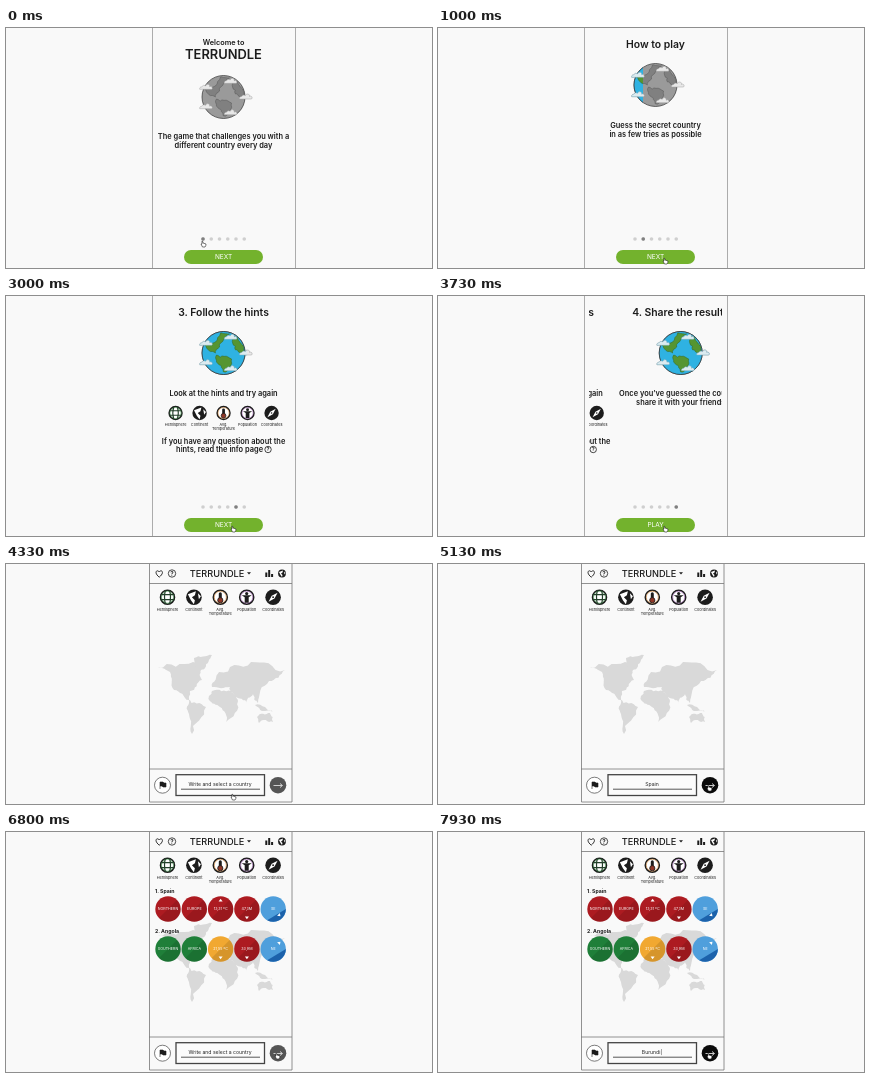
An HTML page for the animation above (8000 ms loop, 426 px wide and 240 px high).

```html
<!DOCTYPE html>
<html lang="en">
<head>
<meta charset="utf-8">
<title>Country guessing game</title>
<style>
html, body { margin: 0; width: 100%; height: 100%; overflow: hidden; background: #f9f9f9; }
svg { display: block; width: 100vw; height: 100vh; }
text { font-family: Inter, sans-serif; }
.gray { filter: grayscale(1); }
</style>
</head>
<body>
<svg id="stage" viewBox="0 0 426 240"></svg>
<script>
const LOOP = 8000, STEP = 132, MID = 217.5, GAME_START = 4250;
const TITLE = 'TERRUNDLE', PROMPT = 'Write and select a country';
const INK = '#1c1c1c', RED = '#ad1b21', GREEN = '#1f7f39', YELLOW = '#f1a831', BLUE = '#4f9fdc';
const slideStarts = [420, 1350, 2170, 2770, 3625];
const guesses = [
  { word: 'Spain', start: 4600, submit: 5200 },
  { word: 'Angola', start: 5800, submit: 6300 },
  { word: 'Burundi', start: 7200, submit: LOOP }
];
const pointerStart = [196, 213];
const pointerMoves = [
  { start: 70, to: [226, 230] },
  { start: GAME_START + 100, to: [214, 221] },
  { start: 4780, to: [270, 221] }
];

const clamp = v => Math.max(0, Math.min(1, v));
const easeOut = v => 1 - (1 - clamp(v)) ** 3;
const mix = (a, b, f) => a + (b - a) * f;
let seed = 11;
const random = () => (seed = seed * 16807 % 2147483647) / 2147483647;

// Drawing helpers
const text = (x, y, size, str, weight = 600, fill = INK, anchor = 'middle') =>
  `<text x="${x}" y="${y}" font-size="${size}" font-weight="${weight}" fill="${fill}" text-anchor="${anchor}">${str}</text>`;
const path = (d, fill = 'none', stroke = 'none', width = 1) =>
  `<path d="${d}" fill="${fill}" stroke="${stroke}" stroke-width="${width}" stroke-linejoin="round"/>`;
const circle = (x, y, r, fill = 'none', stroke = 'none', width = 1) =>
  `<circle cx="${x}" cy="${y}" r="${r}" fill="${fill}" stroke="${stroke}" stroke-width="${width}"/>`;
const rect = (x, y, w, h, fill = 'none', stroke = 'none', width = 1, rx = 0) =>
  `<rect x="${x}" y="${y}" width="${w}" height="${h}" rx="${rx}" fill="${fill}" stroke="${stroke}" stroke-width="${width}"/>`;
const at = (x, y, body, extra = '') => `<g transform="translate(${x} ${y}) ${extra}">${body}</g>`;
const repeat = (n, draw) => Array.from({ length: n }, (_, i) => draw(i)).join('');
const help = (x, y, r) => circle(x, y, r, 'none', INK, .8) + text(x, y + r * .62, r * 1.7, '?');

// Splits every edge at a randomly shifted midpoint, so a few corners become a coastline
const roughen = (points, depth) => depth === 0 ? points : roughen(points.flatMap(([x, y], i) => {
  const [u, v] = points[(i + 1) % points.length], shift = (random() - .5) * .4;
  return [[x, y], [(x + u) / 2 + (v - y) * shift, (y + v) / 2 - (u - x) * shift]];
}), depth - 1);
const coast = (corners, fill, stroke) =>
  path(`M${roughen(corners.split(' ').map(p => p.split(',').map(Number)), 3).join(' ')}Z`, fill, stroke, .5);

// Globe
const cloud = (x, y) => at(x, y,
  path('M-6 2a2 2 0 0 1 2-2.500a3 3 0 0 1 4-1a2 2 0 0 1 4 1a1.500 1.500 0 0 1 2 2.500z', '#dcebf0', '#77a9bb', .5));
const globeArt = circle(0, 0, 21.5, '#2fb2e2', '#333', .7) +
  ['-19,-8 -3,-20 6,-19 -4,-6 -8,0', '-7,2 8,6 0,19 -4,12', '11,-17 19,-8 19,2 12,-3']
    .map(land => coast(land, '#559532', '#34641f')).join('') +
  repeat(5, i => cloud(22 * Math.cos(i * 2 * Math.PI / 5), 16.5 * Math.sin(i * 2 * Math.PI / 5)));
const globe = (k, y) => at(MID, y,
  `<use href="#globe" class="gray"/><clipPath id="part${k}">${rect(-27, -25, 2.5 + 12 * k, 50)}</clipPath>
   <g clip-path="url(#part${k})"><use href="#globe"/></g>`);

// Hint icons
const ring = color => circle(0, 0, 7, '#fff', INK, 1.6) + circle(0, 0, 6, 'none', color, .6);
const world = circle(0, 0, 7.8, INK) + path('M-6-3 2-6 1-2-2 0 1 3 0 7-3 3ZM4-4 7-1 5 2Z', '#fff');
const hints = [
  ['Hemisphere', ring('#3c9b4a') + path('M-7-2.5H7M-7 2.5H7M-2-7Q-4 0-2 7M2-7Q4 0 2 7', 'none', '#23402a', 1.2)],
  ['Continent', world],
  ['Avg.|Temperature', ring('#d78a3c') + rect(-1.5, -5, 3, 8, INK, 'none', 0, 1.5) + circle(0, 3, 2.6, '#8f3626', INK, .8)],
  ['Population', ring('#a265b5') + circle(0, -3.6, 1.6, INK) + path('M-5-2H5L2 0V5.500H-2V0Z', INK)],
  ['Coordinates', circle(0, 0, 7.8, INK) + path('M4.500-4.500 1.400 1.400-4.500 4.500-1.400-1.400Z', '#fff') + circle(0, 0, .9, INK)]
];
const hintRow = (x, gap, y, scale, labelY) => hints.map(([label, art], i) =>
  at(x + gap * i, y, art, `scale(${scale})`) +
  label.split('|').map((line, j) => text(x + gap * i, labelY + j * 4.2, 3.8, line, 400)).join('')).join('');

// Intro slides
const heading = str => text(MID, 20, 10.4, str);
const lines = (y, ...rows) => rows.map((row, i) => text(MID, y + i * 8.5, 7.45, row)).join('');
const slides = [
  text(MID, 17, 7.3, 'Welcome to') + text(MID, 30.5, 12.9, TITLE) + globe(0, 69) +
    lines(111, 'The game that challenges you with a', 'different country every day'),
  heading('How to play') + globe(1, 57) + lines(100, 'Guess the secret country', 'in as few tries as possible'),
  heading('1. Type') + globe(2, 57) + lines(100, 'Type the name of the country at the', 'bottom of the page') +
    `<path d="M182 113Q176 130 190 139" fill="none" stroke="${INK}" stroke-dasharray="3 2"/>` +
    path('M186 139 191 140 189 135', 'none', INK) +
    at(224, 143.5, rect(-39, -5, 78, 10, '#fff', '#333', .8) +
      path('M-20-1H24M-30 2H30', 'none', '#aaa', .6), 'rotate(-11.5)') +
    at(227, 156, rect(-30, -5.5, 60, 11, '#0b0b0b', 'none', 0, 5) + text(0, 1.7, 4.7, 'GUESS IT!', 600, '#fff'), 'rotate(-11)'),
  heading('2. Guess') + globe(3, 57) + lines(100, 'Press the button to check', 'your guess') +
    [RED, GREEN, YELLOW, BLUE].map((c, i) => circle(181.5 + 24 * i, 127, 9, c)).join(''),
  heading('3. Follow the hints') + globe(4, 57) + lines(99.5, 'Look at the hints and try again') +
    hintRow(169.5, 24, 117, .92, 130) +
    lines(147.5, 'If you have any question about the') + text(213.5, 156, 7.45, 'hints, read the info page') + help(262, 153.5, 3.2),
  heading('4. Share the results') + globe(5, 57) + lines(100, 'Once you’ve guessed the country,', 'share it with your friends')
];
const dotX = i => 197 + 8.25 * i;
const intro = path('M146.5 0V240M289.5 0V240', 'none', '#999', .8) +
  `<g clip-path="url(#window)"><g id="track">${slides.map((s, i) => at(STEP * i, 0, s)).join('')}</g></g>` +
  repeat(slides.length, i => circle(dotX(i), 211, 1.8, '#cfcfcf')) +
  `<circle id="dot" cy="211" r="1.8" fill="#808080"/>` +
  rect(178, 222, 79, 14, '#73b22d', 'none', 0, 7) +
  `<text id="next" x="${MID}" y="231.4" font-size="6.5" font-weight="400" fill="#fff" text-anchor="middle"></text>`;

// Game screen
const worldMap = [
  '152,104 187,98 196,116 184,127 183,136 168,126 164,108',
  '188,94 206,91 199,104 193,110',
  '182,135 200,143 186,170 183,150',
  '206,127 225,127 232,137 220,158 214,143 203,136',
  '206,123 213,108 245,98 279,106 263,117 252,139 247,130 241,140 229,131 224,123',
  '249,141 268,148 256,147',
  '251,153 264,149 267,158 253,159'
].map(land => coast(land, '#d9d9d9')).join('');

// Arrow directions in degrees clockwise from up
const tile = (x, y, color, label, turn) => {
  const shade = color === BLUE
    ? path('M12.7 0A12.7 12.7 0 0 1-6 11.2Z', '#1c62ab')
    : path('M9-9A12.7 12.7 0 0 1-9 9Z', 'rgba(0,0,0,.11)');
  const arrow = turn === undefined ? '' : at(0, 0, path('M-2-7.500H2L0-10.300Z', '#fff'), `rotate(${turn})`);
  return at(x, y, circle(0, 0, 12.7, color) + shade + text(0, 1.4, 3.7, label, 400, '#fff') + arrow);
};
const answerRow = (i, ...tiles) => {
  const y = 77 + 40 * i;
  return `<g id="row${i}">` + text(149, y - 15.7, 5.2, `${i + 1}. ${guesses[i].word}`, 700, INK, 'start') +
    tiles.map((t, j) => tile(162 + 26.3 * j, y, ...t)).join('') + '</g>';
};

const game = path('M143.5 0V238H286V0M143 19.5H286M143 205H286', 'none', '#777', .8) +
  path('M153.2 13.2C147 8 151.5 5 153.2 8C155 5 159.5 8 153.2 13.2Z', 'none', INK, .9) +
  help(166, 9.5, 3.7) + text(211, 13, 9.2, TITLE, 500) + path('M241 8.2H245L243 10.6Z', INK) +
  path('M260.3 13V8.5M263.2 13V6M266.1 13V10', 'none', INK, 2) + at(276, 9.5, world, 'scale(.5)') +
  hintRow(161.5, 26.4, 33.2, 1, 47) + worldMap +
  answerRow(0, [RED, 'NORTHERN'], [RED, 'EUROPE'], [RED, '13,31 ºC', 0], [RED, '47,3M', 180], [BLUE, 'SE', 135]) +
  answerRow(1, [GREEN, 'SOUTHERN'], [GREEN, 'AFRICA'], [YELLOW, '21,55 ºC', 180], [RED, '33,9M', 180], [BLUE, 'NE', 45]) +
  circle(156.5, 221.2, 8, '#fff', '#444', .7) + path('M154 225V218H157L158 219H160V223H157L156 222H154', INK, INK, .6) +
  rect(170, 210.7, 88.5, 20.8, '#fbfbfb', '#444', 1.3) + path('M175 225.2H254', 'none', '#444', .9) +
  `<text id="field" x="214" y="221.7" font-size="5.1" font-weight="400" fill="#222" text-anchor="middle"></text>` +
  `<circle id="send" cx="272" cy="221.2" r="8.3"/>` +
  path('M267.5 221.5H276M274 219.5 276.5 221.5 274 223.5', 'none', '#ddd', .9);

const hand = path('M0 0Q1 0 1 2L4 3Q4 5 3 6H.5L-1 3L0 3Z', '#fff', '#222', .6);

const $ = id => document.getElementById(id);
$('stage').innerHTML = `<defs><g id="globe">${globeArt}</g><clipPath id="window">${rect(151, 0, 133, 205)}</clipPath></defs>` +
  `<g id="intro">${intro}</g><g id="game">${game}</g><g id="pointer">${hand}</g>`;

function pointerAt(t) {
  return pointerMoves.reduce((spot, { start, to }) => {
    const f = easeOut((t - start) / 300);
    return spot.map((v, axis) => mix(v, to[axis], f));
  }, pointerStart);
}

function draw() {
  const t = performance.now() % LOOP;
  const playing = t >= GAME_START;
  $('intro').style.display = playing ? 'none' : '';
  $('game').style.display = playing ? '' : 'none';
  $('pointer').setAttribute('transform', `translate(${pointerAt(t)})`);

  const position = slideStarts.reduce((sum, s) => sum + easeOut((t - s) / 250), 0);
  const index = slideStarts.filter(s => t >= s).length;
  $('track').setAttribute('transform', `translate(${-STEP * position} 0)`);
  $('dot').setAttribute('cx', dotX(index));
  $('next').textContent = index === 5 ? 'PLAY' : 'NEXT';

  const guess = guesses.find(g => t >= g.start && t < g.submit);
  const typed = guess ? guess.word.slice(0, 1 + Math.floor((t - guess.start) / 60)) : '';
  const caret = t % 1000 >= 500 ? '|' : '';
  $('field').textContent = guess ? typed + caret : PROMPT;
  $('send').setAttribute('fill', guess && typed === guess.word ? '#0b0b0b' : '#555');
  for (const i of [0, 1]) $('row' + i).setAttribute('opacity', clamp((t - guesses[i].submit) / 130));
  requestAnimationFrame(draw);
}
draw();
</script>
</body>
</html>
```
